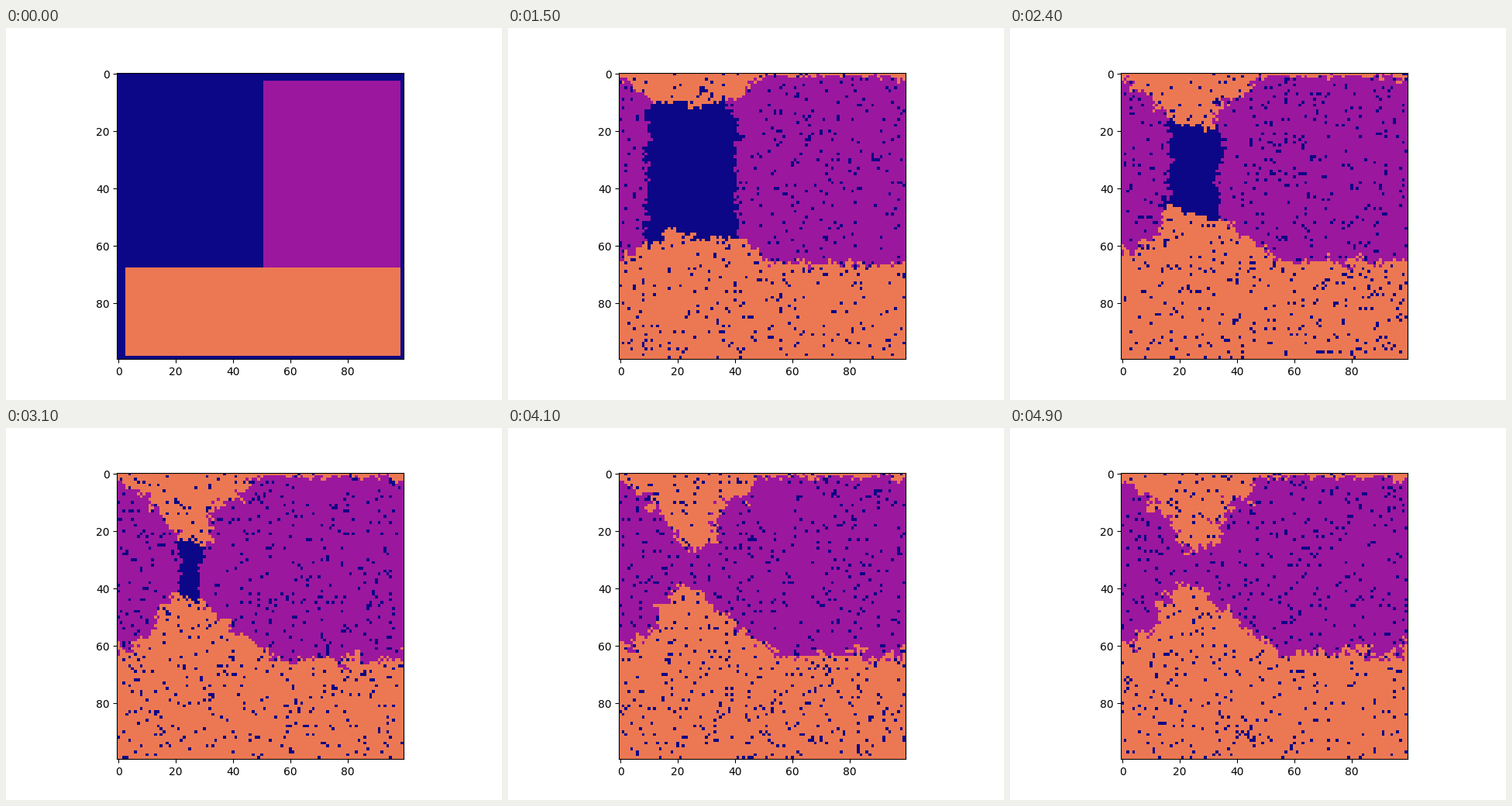
Write a matplotlib script that moves like this. It is 640 px wide and 480 px high and loops after 5000 ms.

```python
import itertools

import matplotlib.pyplot as plt
import numpy as np
from matplotlib.animation import FuncAnimation

SIZE = 100
FRAMES = 50
SPREAD = 0.22    # chance that a cell seeds one given neighbour
DEATH = 0.056    # chance that a living cell dies
TAKEOVER = 0.12  # chance that a stronger seed displaces a weaker cell

INDEX = np.arange(SIZE * SIZE).reshape(SIZE, SIZE)
NEIGHBOURS = [d for d in itertools.product((-1, 0, 1), repeat=2) if d != (0, 0)]


def start_grid():
    grid = np.zeros((SIZE, SIZE), dtype=int)
    grid[3:68, 51:99] = 1
    grid[68:99, 3:99] = 2
    return grid


def step(grid, rng):
    """Grow on a torus; of several seeds, the last one in scan order wins."""
    winner = np.full(grid.shape, -1)
    for row, col in NEIGHBOURS:
        shift = (-row, -col)
        alive = np.roll(grid, shift, axis=(0, 1)) > 0
        seeds = alive & (rng.random(grid.shape) < SPREAD)
        source = np.roll(INDEX, shift, axis=(0, 1))
        winner = np.maximum(winner, np.where(seeds, source, -1))

    seed = np.where(winner >= 0, grid.ravel()[winner], 0)
    displaced = (seed > grid) & (rng.random(grid.shape) < TAKEOVER)
    grown = np.where((grid == 0) | displaced, seed, grid)
    dies = (grid > 0) & (rng.random(grid.shape) < DEATH)
    grown[dies] = 0
    return grown


def simulate():
    rng = np.random.default_rng(7)
    grids = [start_grid()]
    while len(grids) < FRAMES:
        grids.append(step(grids[-1], rng))
    return grids


grids = simulate()
fig, ax = plt.subplots(figsize=(6.4, 4.8), dpi=100)
image = ax.imshow(grids[0], cmap="plasma", vmin=0, vmax=3, interpolation="nearest")


def update(frame):
    image.set_data(grids[frame])
    return [image]


animation = FuncAnimation(fig, update, frames=FRAMES, interval=100,
                          repeat=True, repeat_delay=0)
plt.show()
```
